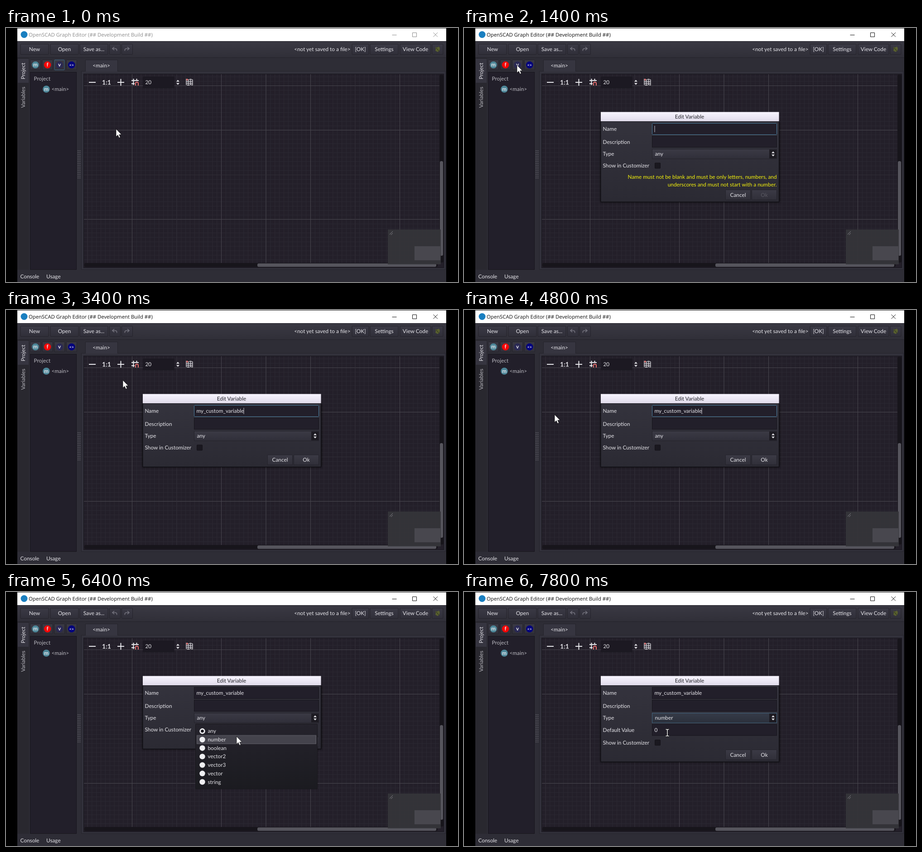
Recreate the animation shown at these times as an HTML page. Size 998 px wide and 561 px high, loop 8000 ms.

```html
<!DOCTYPE html>
<html lang="en">
<head>
<meta charset="utf-8">
<title>Graph editor: new variable</title>
<style>
  html, body { margin: 0; width: 100%; height: 100%; overflow: hidden; background: #000; }
  svg { display: block; width: 100%; height: 100%; }
  text { font: 11.8px Lato, "Open Sans", sans-serif; fill: #e6e5ea; text-rendering: geometricPrecision; white-space: pre; }
  .mid { text-anchor: middle; }
  .end { text-anchor: end; }
  .bold { font-weight: 700; }
  .soft { fill: #b9b8bf; }
  .warn { fill: #f4f10c; }
  .field { fill: #221f2a; stroke: #17151c; }
  .btn { fill: url(#btn); stroke: #24232b; }
  .line { fill: none; stroke: #e8e8ec; stroke-width: 2; }
  .caret { fill: #c9c8d0; }

  .title, .winbtns, .old-focus, .dialog, .frame, .actions, .warn, .ok-label,
  .name1, .name2, .name3, .focus, .caret0, .popup, .hover, .any, .number, .custom, .pointer, .ibeam {
    animation: 8s step-end infinite;
  }
  .title { font: 11.33px "Open Sans", "Noto Sans", sans-serif; animation-name: title; }
  .winbtns { fill: none; animation-name: winbtns; }
  .old-focus { animation-name: old-focus; }
  .dialog { animation-name: dialog; }
  .frame { animation-name: frame; }
  .actions { animation-name: actions; }
  .warn, .caret0 { animation-name: blank; }
  .ok-label { animation-name: ok; }
  .name1 { animation-name: name1; }
  .name2 { animation-name: name2; }
  .name3 { animation-name: name3; }
  .focus { animation-name: focus; }
  .popup { animation-name: popup; }
  .hover { animation-name: hover; }
  .any { animation-name: any; }
  .number { animation-name: number; }
  .custom { animation-name: custom; }
  .pointer { animation-name: pointer; }
  .ibeam { animation-name: ibeam; }

  @keyframes title { 0% { fill: #8c8c8c } 17.5%, 100% { fill: #111 } }
  @keyframes winbtns { 0% { stroke: #8c8c8c } 17.5%, 100% { stroke: #111 } }
  @keyframes old-focus { 0% { opacity: 1 } 17.5%, 100% { opacity: 0 } }
  @keyframes dialog { 0% { opacity: 0 } 17.5%, 100% { opacity: 1 } }
  @keyframes frame { 0% { height: 178px } 27.5% { height: 140.5px } 87.5%, 100% { height: 169px } }
  @keyframes actions {
    0% { transform: translateY(368.5px) }
    27.5% { transform: translateY(331px) }
    87.5%, 100% { transform: translateY(359.5px) }
  }
  @keyframes blank { 0% { opacity: 1 } 27.5%, 100% { opacity: 0 } }
  @keyframes ok { 0% { fill: #5a5963 } 27.5%, 100% { fill: #e6e5ea } }
  @keyframes name1 { 0% { opacity: 0 } 27.5% { opacity: 1 } 40%, 100% { opacity: 0 } }
  @keyframes name2 { 0% { opacity: 0 } 40% { opacity: 1 } 42.5%, 100% { opacity: 0 } }
  @keyframes name3 { 0% { opacity: 0 } 42.5%, 100% { opacity: 1 } }
  @keyframes focus { 0% { opacity: 1 } 72.5%, 100% { opacity: 0 } }
  @keyframes popup { 0% { opacity: 0 } 72.5% { opacity: 1 } 87.5%, 100% { opacity: 0 } }
  @keyframes hover {
    0% { opacity: 0; transform: translateY(0) }
    75% { opacity: 1; transform: translateY(0) }
    80%, 100% { opacity: 1; transform: translateY(18.7px) }
  }
  @keyframes any { 0% { opacity: 1 } 87.5%, 100% { opacity: 0 } }
  @keyframes number { 0% { opacity: 0 } 87.5%, 100% { opacity: 1 } }
  @keyframes custom { 0% { transform: translateY(0) } 87.5%, 100% { transform: translateY(28.7px) } }
  @keyframes pointer {
    0% { transform: translate(243px, 223px); opacity: 1; animation-timing-function: steps(6) }
    15% { transform: translate(117px, 82px) }
    20% { transform: translate(117px, 82px); animation-timing-function: steps(3) }
    27.5% { transform: translate(258px, 155px) }
    60% { transform: translate(200px, 231px); animation-timing-function: steps(5) }
    72.5% { transform: translate(520px, 285px) }
    75% { transform: translate(516px, 312px); animation-timing-function: steps(4) }
    85% { transform: translate(502px, 326px); opacity: 1 }
    97.5%, 100% { transform: translate(502px, 326px); opacity: 0 }
  }
  @keyframes ibeam { 0% { opacity: 0 } 97.5%, 100% { opacity: 1 } }
</style>
</head>
<body>
<svg viewBox="0 0 998 561">
  <defs>
    <linearGradient id="btn" x2="0" y2="1"><stop stop-color="#3b3a45"/><stop offset="1" stop-color="#302f39"/></linearGradient>
    <linearGradient id="bar" x2="0" y2="1"><stop stop-color="#3a3943"/><stop offset="1" stop-color="#302f38"/></linearGradient>
    <linearGradient id="head" x2="0" y2="1"><stop stop-color="#f8f5ff"/><stop offset="1" stop-color="#e0dbea"/></linearGradient>
    <linearGradient id="body" x2="0" y2="1"><stop stop-color="#34333d"/><stop offset="1" stop-color="#2b2a33"/></linearGradient>
    <linearGradient id="blue" x2="0" y2="1"><stop stop-color="#363b48"/><stop offset="1" stop-color="#2b303b"/></linearGradient>
    <linearGradient id="menu" x2="0" y2="1"><stop stop-color="#25232c"/><stop offset="1" stop-color="#1b1b20"/></linearGradient>
    <pattern id="minor" x="278" y="127" width="9.85" height="9.85" patternUnits="userSpaceOnUse">
      <path d="M.5 0V9.85M0 .5H9.85" stroke="#2b2832"/>
    </pattern>
    <filter id="shade" x="-5%" y="-10%" width="110%" height="120%"><feGaussianBlur stdDeviation="2"/></filter>
    <path id="updown" d="M-3.5 -1.5L0 -5.5 3.5 -1.5zM-3.5 1.5L0 5.5 3.5 1.5z" fill="#e8e8ec"/>
  </defs>

  <!-- window -->
  <rect x="25" width="947" height="561" fill="#2e2d36"/>
  <rect x="25" y="1" width="947" height="28" fill="#fff"/>
  <path d="M25 .5H972" stroke="#3a3a3a"/>
  <circle cx="40" cy="14.5" r="7.5" fill="#1a7fc0"/>
  <text class="title" x="50" y="19">OpenSCAD Graph Editor (## Development Build ##)</text>
  <path class="winbtns" d="M852.5 15.5H862.5M897.5 10.5h9v9h-9zM943.5 10l9.5 9.5M953 10l-9.5 9.5"/>

  <!-- toolbar -->
  <rect x="25" y="29" width="947" height="36" fill="url(#bar)"/>
  <path d="M25 29.5H972M25 65.5H972" stroke="#24232b"/>
  <g id="bar-buttons"></g>
  <g fill="none" stroke="#74737e" stroke-width="1.6">
    <path id="undo" d="M239 42l-4 3.5 4 3.5M235.5 45.5h6q4 .5 3 5"/>
    <use href="#undo" transform="matrix(-1 0 0 1 507 0)"/>
  </g>
  <text class="end" x="760.5" y="51.3">&lt;not yet saved to a file&gt;</text>
  <path d="M948 42l4 1 4-2 2 4-1 5-4 3-5-3 1-4z" fill="#59602f"/>
  <path d="M949 43l7 8" stroke="#3c4222" stroke-width="1.5"/>

  <!-- side panel -->
  <rect x="25" y="66" width="26" height="468" fill="#29282f"/>
  <rect x="26" y="68" width="24" height="53" fill="#363540"/>
  <text class="mid" transform="translate(41.5 95) rotate(-90)">Project</text>
  <text class="mid soft" transform="translate(41.5 153) rotate(-90)">Variables</text>
  <rect x="53.5" y="97.5" width="102" height="436" class="field"/>
  <g id="side-buttons"></g>
  <rect class="old-focus" x="107" y="70.5" width="22" height="22" rx="1" fill="none" stroke="#3f6a86"/>
  <text class="soft" x="61.500" y="116.300">Project</text>
  <circle cx="89" cy="135" r="7.800" fill="#4d8799"/>
  <text class="mid bold" x="89" y="138.500">m</text>
  <text class="soft" x="100.500" y="139.300">&lt;main&gt;</text>
  <g id="grip" fill="#6d6c75"></g>

  <!-- graph -->
  <rect x="166.500" y="95.500" width="804" height="438" fill="#32313b" stroke="#25242c"/>
  <path d="M175.500 96V70.500H246.500V96" fill="#363540" stroke="#24232b"/>
  <text class="mid" x="210.500" y="87">&lt;main&gt;</text>
  <rect x="171.500" y="101.500" width="795" height="428" fill="#231f29" stroke="#17151c"/>
  <rect x="172" y="102" width="785" height="417" fill="url(#minor)"/>
  <path d="M278.500 102V519M475.500 102V519M574 102V519M672.500 102V519M869.500 102V519M172 127.500H957M172 225.500H957M172 422.500H957" stroke="#48464e"/>
  <path d="M180 102V519M377 102V519M771 102V519M172 324.500H957" stroke="#302d36"/>
  <rect x="957" y="103" width="9" height="415" rx="3" fill="#17151b"/>
  <rect x="173" y="519" width="780" height="9" rx="3" fill="#17151b"/>
  <rect x="958" y="294" width="7" height="209" rx="3" fill="#56555d"/>
  <rect x="555" y="520" width="395" height="7.500" rx="3" fill="#56555d"/>
  <rect x="843" y="445" width="117" height="77" fill="#35353a" fill-opacity=".93"/>
  <rect x="902" y="482" width="57" height="31" fill="#48474e"/>
  <path d="M847 456l7-7M850 457l4-4" stroke="#85848a"/>

  <path class="line" d="M183 120H198M246 120H261M253.500 112.500V127.500"/>
  <text class="mid bold" x="222" y="124.500" style="font-size:14px">1:1</text>
  <path class="line" d="M281.500 112V126M288.500 112V117M277 116H293M277 123H284" stroke-width="1.700"/>
  <path d="M286 127V122.500a3 3 0 0 1 6 0V127" fill="none" stroke="#e87070" stroke-width="2"/>
  <rect x="303" y="108" width="68" height="24" fill="#1c1922" stroke="#19171e"/>
  <text x="307.500" y="124">20</text>
  <use href="#updown" x="379.500" y="120"/>
  <path d="M398 113l4.500 1.500 5-1.500 4.500 1.500V126l-4.500-1-5 1.500-4.500-1.500zM402.500 114V126M407.500 113V125M398 118H412M398 122H412" fill="none" stroke="#d2d1d6" stroke-width="1.300"/>
  <circle cx="400" cy="114" r="2" fill="#d86a6a"/>

  <text x="31.500" y="553">Console</text>
  <text x="89" y="553">Usage</text>

  <!-- dialog -->
  <g class="dialog">
    <rect class="frame" x="301" y="207" width="396" height="140" fill="#000" opacity=".6" filter="url(#shade)"/>
    <rect class="frame" x="302" y="206" width="393.500" height="140" fill="url(#body)" stroke="#0d0c10"/>
    <rect x="302" y="185.500" width="393.500" height="20.500" fill="url(#head)"/>
    <text class="mid" x="498" y="200" style="fill:#25242b">Edit Variable</text>

    <text x="306.500" y="227.200">Name</text>
    <rect class="field" x="415.500" y="210.500" width="275" height="25"/>
    <g class="focus">
      <rect x="415.500" y="210.500" width="275" height="25" rx="1" fill="none" stroke="#4a7c9c"/>
      <rect class="caret caret0" x="420.500" y="216" width="1" height="14"/>
      <rect class="caret name1" x="430.500" y="216" width="1" height="14"/>
      <rect class="caret name2" x="484.500" y="216" width="1" height="14"/>
      <rect class="caret name3" x="524.500" y="216" width="1" height="14"/>
    </g>
    <text class="name1" x="420.500" y="227.200">m</text>
    <text class="name2" x="420.500" y="227.200">my_custom_</text>
    <text class="name3" x="420.500" y="227.200">my_custom_variable</text>

    <text x="306.500" y="255.700">Description</text>
    <rect class="field" x="415.500" y="238.500" width="275" height="25"/>

    <text x="306.500" y="282.200">Type</text>
    <rect class="btn" x="415.500" y="267.500" width="275" height="21.500"/>
    <rect class="number" x="415.500" y="267.500" width="275" height="21.500" fill="url(#blue)" stroke="#41657f"/>
    <rect x="674" y="268.500" width="16" height="19.500" fill="#1d1b22"/>
    <use href="#updown" x="682.500" y="278"/>
    <text class="any" x="421.500" y="282.200">any</text>
    <text class="number" x="421.500" y="282.200">number</text>

    <g class="number">
      <text x="306.500" y="308.700">Default Value</text>
      <rect class="field" x="415.500" y="292" width="275" height="25"/>
      <text x="420.500" y="308.700">0</text>
    </g>
    <g class="custom">
      <text x="306.500" y="308">Show in Customizer</text>
      <rect x="421.500" y="298" width="12" height="12" rx="1" fill="#1a181f" stroke="#141218"/>
    </g>
    <text class="warn end" x="690.500" y="332.500">Name must not be blank and must be only letters, numbers, and</text>
    <text class="warn end" x="690.500" y="350">underscores and must not start with a number.</text>

    <g class="actions">
      <rect class="btn" x="577.500" y="-11" width="55" height="22" rx="1"/>
      <text class="mid" x="605" y="4">Cancel</text>
      <rect class="btn" x="635.500" y="-11" width="55" height="22" rx="1"/>
      <text class="mid ok-label" x="663" y="4">Ok</text>
    </g>
  </g>

  <g class="popup">
    <rect x="418.500" y="291.500" width="269" height="143.500" rx="1" fill="url(#menu)" stroke="#18171c"/>
    <rect class="hover" x="421.500" y="298" width="263" height="18.500" fill="#44434c" stroke="#65646c"/>
    <g id="types"></g>
    <circle cx="433.500" cy="307.300" r="3.300" fill="#1b1920"/>
  </g>

  <!-- pointers -->
  <path class="pointer" d="M0 0V17L3.900 13.400 6.600 19.600 9.400 18.400 6.800 12.400H12z" fill="#fff" stroke="#000" stroke-width=".7"/>
  <g class="ibeam" fill="none">
    <path id="beam" d="M445.500 303.500H448L449 304.500 450 303.500H452.500M449 304V317M445.500 318H448L449 317 450 318H452.500" stroke="#000" stroke-width="3"/>
    <use href="#beam" style="display:none"/>
    <path d="M445.500 303.500H448L449 304.500 450 303.500H452.500M449 304V317M445.500 318H448L449 317 450 318H452.500" stroke="#fff" stroke-width="1.500"/>
  </g>
</svg>
<script>
  const fill = (id, items, draw) => {
    document.getElementById(id).innerHTML = items.map(draw).join('');
  };

  const button = (x, y, w, h) => `<rect class="btn" x="${x}" y="${y}" width="${w}" height="${h}" rx="1"/>`;

  fill('bar-buttons', [
    ['New', 32, 62], ['Open', 98, 62], ['Save as...', 163, 62], ['', 228.5, 24], ['', 255.5, 24],
    ['[OK]', 764, 37], ['Settings', 804, 62], ['View Code', 870, 68], ['', 941, 24]
  ], ([label, x, w]) => button(x, 35.5, w, 23) +
    `<text class="mid" x="${x + w / 2}" y="51.3">${label}</text>`);

  fill('side-buttons', [
    ['m', '#4d8799'], ['f', '#f50505'], ['v', '#2a2954'], ['&lt;&gt;', '#00007d']
  ], ([label, color], i) => {
    const x = 65 + i * 26.6;
    const size = i === 3 ? 9 : 11.8;
    return button(x - 11.5, 70.5, 23, 22) +
      `<circle cx="${x}" cy="81.5" r="7.8" fill="${color}"/>` +
      `<text class="mid bold" x="${x}" y="85.3" style="font-size:${size}px">${label}</text>`;
  });

  fill('grip', [...Array(48).keys()], i =>
    `<rect x="${158 + i % 3 * 2.7}" y="${270.5 + Math.floor(i / 3) * 4}" width="1.3" height="1.5"/>`);

  fill('types', ['any', 'number', 'boolean', 'vector2', 'vector3', 'vector', 'string'], (name, i) => {
    const y = 307.3 + i * 18.7;
    return `<circle cx="433.5" cy="${y}" r="6.2" fill="#efeff2"/><text x="445.5" y="${y + 4}">${name}</text>`;
  });
</script>
</body>
</html>
```
